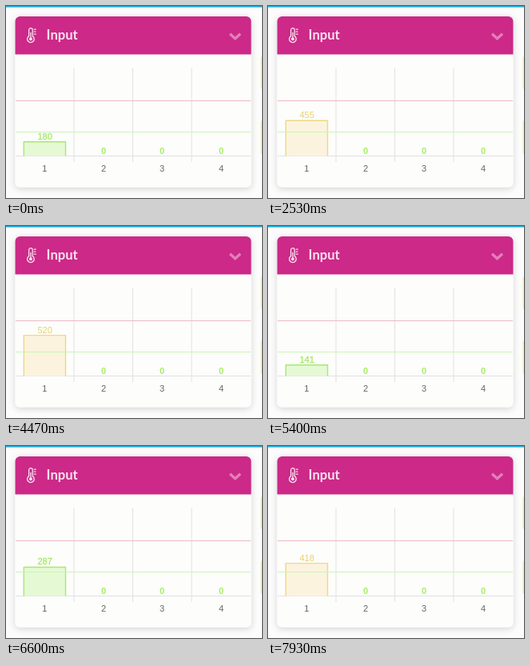
Animation, 320 px wide and 240 px high, one loop 8 s. Source, as an HTML page:

```html
<!DOCTYPE html>
<html lang="en">
<head>
<meta charset="utf-8">
<title>Input chart</title>
<style>
  html, body { margin: 0; width: 100%; height: 100%; overflow: hidden; background: #fcfcfc; }
  svg { display: block; width: 100vw; height: 100vh; }
  text { font: 11px "Liberation Sans", Arial, sans-serif; text-anchor: middle; }
  .title { font: 700 16.6px Lato, sans-serif; text-anchor: start; fill: #fae3f0; }
  .zero { font-weight: 700; fill: #a8ec68; }
  .tick { fill: #666; }
  .grid { stroke: #e1e1e1; }
</style>
</head>
<body>
<svg viewBox="0 0 320 240">
  <defs>
    <filter id="shadow" x="-10%" y="-10%" width="120%" height="125%">
      <feDropShadow dx="0" dy="2" stdDeviation="4" flood-color="#000" flood-opacity=".16"/>
    </filter>
  </defs>
  <rect width="320" height="240" fill="#fcfcfc"/>
  <rect width="320" height="1.6" fill="#1eaadb"/>
  <g id="side">
    <rect x="318.5" y="63" width="8" height="41" rx="2"/>
    <rect x="318.5" y="143" width="8" height="42" rx="2"/>
  </g>

  <rect x="11.5" y="13" width="295" height="213.5" rx="6" fill="#fdfdfc" filter="url(#shadow)"/>
  <path d="M11.5 60.5V19a6 6 0 0 1 6-6h283a6 6 0 0 1 6 6v41.5z" fill="#cc2988"/>
  <g fill="none" stroke="#fae3f0" stroke-width="1.3" stroke-linecap="round">
    <path d="M28.6 37.6V30a2.3 2.3 0 0 1 4.6 0v7.6a4.3 4.3 0 1 1-4.6 0z"/>
    <path d="M30.9 33.5v7"/>
    <circle cx="30.9" cy="41.2" r="1.3" fill="#fae3f0"/>
    <path d="M35.2 29.2h2M35.2 32.2h1.6M35.2 35.2h2"/>
  </g>
  <text class="title" x="50.6" y="42">Input</text>
  <path d="M280 34.8l6.5 6 6.5-6" fill="none" stroke="#e27fb9" stroke-width="3.4"/>

  <g id="axes"></g>
  <path id="bar" stroke-width="1.4"/>
  <path d="M12 118.5H306" stroke="#eeb9c5"/>
  <path d="M12 157.5H306" stroke="#c8f5b4"/>
  <text id="label" x="48.6"></text>
</svg>
<script>
const $ = id => document.getElementById(id);
const LOOP = 8000, EASE_MS = 800, BASE = 187.5, SCALE = 0.0978;

// [start time, new value]; the first reading arrives before the loop begins
const readings = [
  [-470, 180], [510, 152], [1370, 177], [1970, 455], [2840, 74],
  [3700, 520], [4570, 141], [5440, 825], [6300, 287], [7170, 418]
];
const FIRST = 230;

const levels = [
  { upTo: 300, line: '#a9e872', fill: '#e5f9d5', text: '#a5e766', weight: 0.3 },
  { upTo: 700, line: '#ecd984', fill: '#fcf3de', text: '#e6d069', weight: 0 },
  { upTo: Infinity, line: '#d7688d', fill: '#f9dae3', text: '#d84f7d', weight: 0 }
];

const columns = [48.3, 122, 195, 269];
$('axes').innerHTML =
  [85, 158.5, 232].map(x => `<path class="grid" d="M${x} 77V195"/>`).join('') +
  `<path class="grid" d="M12 ${BASE}H306"/>` +
  columns.map((x, i) =>
    `<text class="tick" x="${x}" y="206.5">${i + 1}</text>` +
    (i ? `<text class="zero" x="${x}" y="185">0</text>` : '')).join('');

const easeOutQuart = p => 1 - (1 - p) ** 4;

function draw(t) {
  const i = readings.findLastIndex(([start]) => start <= t);
  const [start, value] = readings[i];
  const from = i ? readings[i - 1][1] : FIRST;
  const p = Math.min(1, (t - start) / EASE_MS);
  const top = BASE - SCALE * (from + (value - from) * easeOutQuart(p));
  const level = levels.find(l => value < l.upTo);

  const bar = $('bar'), label = $('label');
  bar.setAttribute('d', `M22.3 ${BASE}V${top}H74.5V${BASE}`);
  bar.setAttribute('fill', level.fill);
  bar.setAttribute('stroke', level.line);
  label.textContent = value;
  label.setAttribute('y', top - 3);
  label.setAttribute('fill', level.text);
  label.setAttribute('stroke', level.text);
  label.setAttribute('stroke-width', level.weight);
  $('side').setAttribute('fill', t < 5500 ? '#f5ee98' : '#e6f29c');
}

const began = performance.now();
function tick() {
  draw((performance.now() - began) % LOOP);
  requestAnimationFrame(tick);
}
tick();
</script>
</body>
</html>
```
